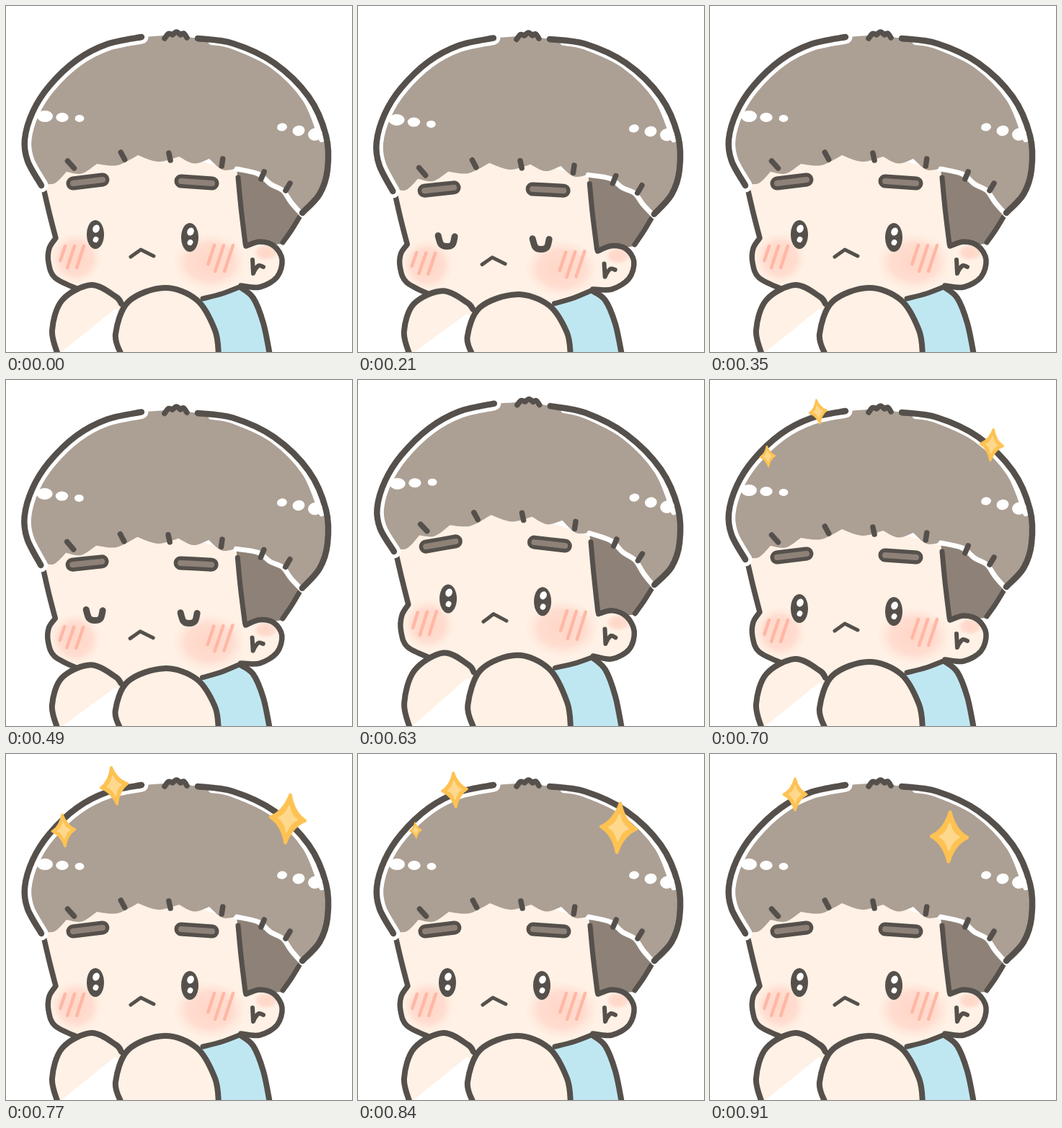
Animation, 480 px wide and 480 px high, one loop 1.05 s. Source, as an HTML page:

```html
<!DOCTYPE html>
<html lang="en">
<head>
<meta charset="utf-8">
<title>Blinking boy</title>
<style>
html, body { margin: 0; width: 100%; height: 100%; overflow: hidden; background: #fff; }
svg { display: block; width: 100vw; height: 100vh; }
path { fill: none; stroke-linecap: round; stroke-linejoin: round; }
.state { opacity: 0; animation: 1050ms step-end infinite; }
#calm { animation-name: calm; }
#down { animation-name: down; }
#up { animation-name: up; }
#glint { animation-name: glint; }
#shine { animation-name: shine; }
#drift { animation-name: drift; }
#fade { animation-name: fade; }
@keyframes calm { 0%, 33.333%, 66.666%, 100% { opacity: 1 } 20%, 46.666% { opacity: 0 } }
@keyframes down { 0%, 33.333%, 60%, 100% { opacity: 0 } 20%, 46.666% { opacity: 1 } }
@keyframes up { 0%, 66.666%, 100% { opacity: 0 } 60% { opacity: 1 } }
@keyframes glint { 0%, 73.333%, 100% { opacity: 0 } 66.666% { opacity: 1 } }
@keyframes shine { 0%, 80%, 100% { opacity: 0 } 73.333% { opacity: 1 } }
@keyframes drift { 0%, 86.666%, 100% { opacity: 0 } 80% { opacity: 1 } }
@keyframes fade { 0%, 100% { opacity: 0 } 86.666% { opacity: 1 } }
</style>
</head>
<body>
<svg id="stage" viewBox="0 0 480 480">
  <defs>
    <radialGradient id="blush">
      <stop offset="0" stop-color="#ffd6c6"/>
      <stop offset=".65" stop-color="#ffddd0"/>
      <stop offset="1" stop-color="#ffeade" stop-opacity=".2"/>
    </radialGradient>
  </defs>
</svg>
<script>
const INK = '#55504b', HAIR = '#ac9f94', SIDE = '#8e8278', SKIN = '#fff1e5';
const SHIRT = '#bfe7f2', PINK = '#ffb7a5', GOLD = '#fdc252', PALE = '#fdd88d';

// The face swells down or up; rising also lifts the crown.
function warp([x, y], pose) {
  const r2 = ((x - 190) / 190) ** 2 + ((y - 270) / 190) ** 2;
  const swell = 11 * Math.exp(-r2 * r2);
  const height = Math.min(1, Math.max(0, (390 - y) / 180));
  const lift = 9 * height * Math.exp(-(((x - 205) / 170) ** 2));
  const dy = { calm: 0, down: swell, up: -swell - lift }[pose];
  return [x - dy * 0.08, y + dy];
}

// Smooth curve through "x y, x y"; a slash makes a corner.
function curve(text, pose) {
  let d = '', last;
  for (const run of text.split('/')) {
    const pts = run.split(',').map(s => warp(s.trim().split(' ').map(Number), pose));
    if (last) pts.unshift(last);
    else d = 'M' + pts[0];
    const at = i => pts[Math.max(0, Math.min(pts.length - 1, i))];
    for (let i = 0; i < pts.length - 1; i++) {
      const [a, b, c, e] = [at(i - 1), at(i), at(i + 1), at(i + 2)];
      const c1 = b.map((v, k) => v + (c[k] - a[k]) / 6);
      const c2 = c.map((v, k) => v - (e[k] - b[k]) / 6);
      d += `C${c1} ${c2} ${c}`;
    }
    last = at(pts.length - 1);
  }
  return d;
}

// Row of lobes hanging between notches
function lobes(text, sag) {
  const pts = text.split(', ').map(s => s.split(' ').map(Number));
  return pts.map(([x, y], i) => {
    if (!i) return `${x} ${y}`;
    const [px, py] = pts[i - 1];
    return `${(x + px) / 2} ${(y + py) / 2 + sag}, ${x} ${y}`;
  }).join('/');
}

const CROWN_L = '49 249, 30 215, 26 185, 37 147, 60 111, 98 75, 140 53, 188 43';
const CROWN_R = '266 45, 315 52, 372 79, 420 126, 444 180, 446 227, 435 261, 411 287';
const SEAM = '411 290, 396 273, 384 256, 367 247, 350 233, 320 226';
const FRINGE = lobes('318 226, 282 212, 240 209, 183 207, 126 219, 84 230, 51 246', 8);
const TUFT = lobes('220 45, 231 40, 242 40, 251 44', -4);
const FACE = '53 257, 60 287, 69 322/60 336, 59 356, 68 377, 100 393';
const EAR = '333 333, 352 327, 372 333, 383 352, 376 376, 352 390, 326 388';
const HAND_L = '72 484, 64 450, 78 408, 118 387, 152 403, 160 413';
const HAND_R = '160 484, 152 455, 170 410, 220 391, 265 408, 290 450, 295 484';
const SLEEVE = '325 390, 343 405, 357 440, 366 484';
const TICKS = [[90, 220], [162, 208], [227, 209], [300, 217], [356, 235], [391, 251]];
const TRIO = [0, 1, 2];

function boy(pose) {
  const fill = (text, color) => `<path d="${curve(text, pose)}Z" style="fill:${color}"/>`;
  const line = (text, width, color = INK) =>
    `<path d="${curve(text, pose)}" stroke="${color}" stroke-width="${width}"/>`;
  const blob = (text, color, width) => fill(text, color) + line(text, width);
  const dot = (x, y, rx, ry, color = '#fff', tilt = 0) => {
    const [cx, cy] = warp([x, y], pose);
    return `<ellipse rx="${rx}" ry="${ry}" fill="${color}" transform="translate(${cx} ${cy}) rotate(${tilt})"/>`;
  };
  const trio = part => TRIO.map(part).join('');

  const hatch = (x, y, length) => trio(i => {
    const left = x + 13 * i, run = i ? length : length - 10;
    return line(`${left} ${y}, ${left - run * 0.33} ${y + run}`, 4.5, PINK);
  });
  const brow = text => line(text, 19) + line(text, 8, SIDE);
  const openEye = (x, y) => dot(x, y, 12, 20, INK) +
    dot(x + 1, y - 8, 4.6, 5.8, '#fff', 25) + dot(x + 0.5, y + 7, 3.8, 4.2, '#fff', 25);
  const shutEye = (x, y) =>
    line(`${x - 12} ${y - 9}, ${x - 8} ${y + 3}, ${x} ${y + 6}, ${x + 8} ${y + 3}, ${x + 11} ${y - 8}`, 9);
  const eye = pose === 'down' ? shutEye : openEye;

  const body = fill('270 404/325 390/' + SLEEVE + '/280 484', SHIRT) + line(SLEEVE, 8);

  const face = fill(FACE + '/160 425/275 405/327 389/340 330/322 230/200 195/90 212/50 240', SKIN) +
    dot(97, 350, 35, 35, 'url(#blush)') + dot(283, 355, 50, 39, 'url(#blush)') +
    hatch(82, 333, 30) + hatch(289, 332, 36) +
    line(FACE, 7.5) + line('273 406, 300 399, 326 389', 7);

  const side = fill(SEAM + '/333 334/384 330', SIDE) +
    fill(EAR, SKIN) + dot(361, 342, 18, 12, 'url(#blush)') + line(EAR, 7.5) +
    line('342 352, 343 371/346 365, 351 360, 357 362', 6) +
    line('322 238, 326 280, 332 330', 7) + line('407 293, 396 311, 384 328', 7);

  const hair = fill(CROWN_L + '/235 40/' + CROWN_R + '/' + SEAM + '/' + FRINGE, HAIR) +
    line(SEAM, 7, '#fff') +
    line(CROWN_L, 19, '#fff') + line('285 50, 315 56, 369 82, 415 129, 438 185', 8, '#fff') +
    line(CROWN_L, 8.5) + line(CROWN_R, 8.5) + line(TUFT, 7.5) +
    TICKS.map(([x, y]) => {
      const lean = (270 - x) * 0.025;
      return line(`${x - lean} ${y - 5}, ${x + lean} ${y + 5}`, 7.5);
    }).join('') +
    trio(i => dot(54 + 24 * i, 153 + 1.5 * i, 11 - 2.3 * i, 8 - 1.5 * i)) +
    trio(i => dot(383 + 23 * i, 168 + 5 * i, 7 + 1.5 * i, 5.5 + 1.6 * i, '#fff', -12));

  const features = brow('93 246, 134 241') + brow('243 243, 286 246') +
    eye(124, 317) + eye(255, 321) + line('173 348/187 338/205 347', 5);

  return body + face + side + hair + features + blob(HAND_L, SKIN, 8) + blob(HAND_R, SKIN, 8);
}

// Each star is centre x, y, height and tilt.
const START = [[150, 44, 55, -9], [391, 90, 71, 6], [80, 106, 47, -5]];
const END = [[118, 56, 47, 0], [332, 115, 73, 2]];
const MIDWAY = END.map((star, i) => star.map((v, k) => (v + START[i][k]) / 2));

function stars(list, size = 1) {
  const tip = 'M0-.5Q.1-.13 .36 0Q.1.13 0 .5Q-.1.13-.36 0Q-.1-.13 0-.5Z';
  const layer = (scale, color) =>
    `<path d="${tip}" transform="scale(${scale})" style="fill:${color}" stroke="${color}" stroke-width=".07"/>`;
  return list.map(([x, y, h, tilt]) =>
    `<g transform="translate(${x} ${y}) rotate(${tilt}) scale(${h * size})">${layer(0.94, GOLD)}${layer(0.5, PALE)}</g>`
  ).join('');
}

const states = {
  calm: boy('calm'),
  down: boy('down'),
  up: boy('up'),
  glint: stars(START, 0.65),
  shine: stars(START),
  drift: stars(MIDWAY) + stars(START.slice(2), 0.5),
  fade: stars(END)
};
document.getElementById('stage').innerHTML +=
  Object.entries(states).map(([id, art]) => `<g id="${id}" class="state">${art}</g>`).join('');
</script>
</body>
</html>
```
